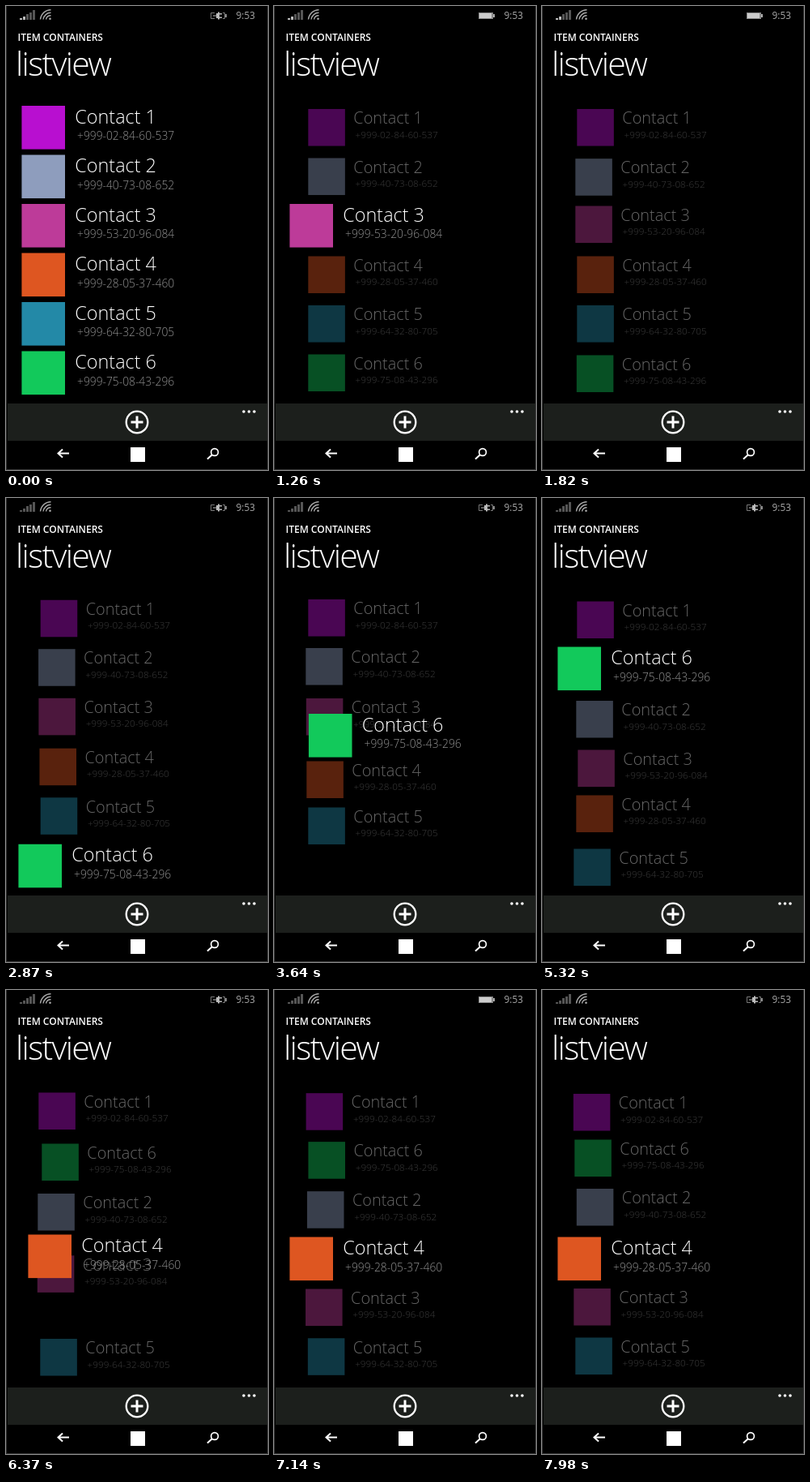
Write an HTML page that moves like this. It is 324 px wide and 572 px high and loops after 8000 ms.

```html
<!DOCTYPE html>
<html lang="en">
<head>
<meta charset="utf-8">
<title>List reorder</title>
<style>
  html, body { margin: 0; width: 100%; height: 100%; overflow: hidden; background: #000; }
  svg { display: block; width: 324px; height: 572px; }
  text { font-family: "Open Sans", "Noto Sans", sans-serif; fill: #fff; }
  .section { font-size: 12px; font-weight: 600; }
  .title { font-size: 41px; font-weight: 350; letter-spacing: -1.7px; }
  .name { font-size: 23.4px; font-weight: 350; }
  .phone { font-size: 13.8px; font-weight: 350; fill: #949494; }
  .clock { font-size: 11.8px; fill: #aaa; }
  .line { fill: none; stroke: #fff; }
  .status { fill: none; stroke: #aaa; }
</style>
</head>
<body>
<svg viewBox="0 0 324 572">
  <rect width="324" height="572"/>
  <g id="signal"></g>
  <g class="status" stroke-width="1.4">
    <path d="M42.500 16.500A13 13 0 0 1 55.500 4.800M46 16.500A9.500 9.500 0 0 1 55.500 8.300M49.500 16.500A6 6 0 0 1 55.500 11.800"/>
    <circle cx="54.500" cy="15.800" r="1.300" fill="#aaa" stroke="none"/>
  </g>
  <g id="full">
    <rect x="253" y="8" width="18" height="8" fill="#888"/>
    <rect x="254" y="9" width="15" height="6" fill="#ccc"/>
    <rect x="271" y="10" width="2" height="4" fill="#aaa"/>
  </g>
  <g id="plug">
    <path class="status" d="M258 8.500H253.500V15.500H258M268 8.500H270.500V15.500H268" stroke-opacity=".7"/>
    <path d="M256 11.500h4v-2.500h2v-1.500h2v9h-2v-1.500h-2v-2.500h-4zM264 9h3v1.500h-3zM264 13.500h3v1.500h-3z" fill="#bbb"/>
    <rect x="271" y="10" width="2" height="4" fill="#888"/>
  </g>
  <text class="clock" x="284.500" y="16">9:53</text>
  <text class="section" x="14.500" y="43">ITEM CONTAINERS</text>
  <text class="title" x="12" y="86">listview</text>

  <g id="list"></g>

  <rect x="2" y="490" width="321" height="46" fill="#1c1f1c"/>
  <circle class="line" cx="162" cy="513" r="13.300" stroke-width="2.300"/>
  <path class="line" d="M154.500 513h15M162 505.500v15" stroke-width="3"/>
  <g fill="#fff">
    <circle cx="294" cy="500" r="1.800"/>
    <circle cx="300.500" cy="500" r="1.800"/>
    <circle cx="307" cy="500" r="1.800"/>
  </g>
  <path class="line" d="M78 551.500H65M70 546.500L64.500 551.500L70 556.500" stroke-width="2"/>
  <rect x="154" y="544" width="18" height="18" fill="#fff"/>
  <circle class="line" cx="258" cy="550" r="4.400" stroke-width="1.700"/>
  <path class="line" d="M254.800 553.300L249 558.500" stroke-width="2"/>
  <path class="line" d="M.5 0V571.500H323.500V0" stroke="#fff" stroke-opacity=".2"/>
</svg>
<script>
const LOOP = 8000, STEP = 70;
const PIVOT = 172, SMALL = 0.85, DIM = 0.4;
const slot = i => 149.5 + 60.5 * i;
const $ = id => document.getElementById(id);

function add(parent, tag, attrs, text) {
  const el = document.createElementNS("http://www.w3.org/2000/svg", tag);
  for (const key in attrs) el.setAttribute(key, attrs[key]);
  if (text) el.textContent = text;
  return parent.appendChild(el);
}

// Eased value of a track of [time, value] keys.
function at(keys, t) {
  if (t <= keys[0][0]) return keys[0][1];
  for (let i = 1; i < keys.length; i++) {
    const [a, from] = keys[i - 1], [b, to] = keys[i];
    if (t < b) {
      const u = (t - a) / (b - a);
      return from + (to - from) * u * u * (3 - 2 * u);
    }
  }
  return keys[keys.length - 1][1];
}

const move = (start, length, from, to) =>
  [[start, slot(from)], [start + length, slot(to)]];

const SHRINK = [[350, 1], [560, 0]];
const DRIFT_TIMES = [1400, 1820, 3640, 4620, 5320, 6370, 7980];
const drift = values => DRIFT_TIMES.map((t, i) => [t, i ? values[i - 1] : 0]);

// size: 1 is selected, 0 is floating; x: drag offset; dx, dy: floating drift
const items = [
  {
    color: "#b80fd0", phone: "+999-02-84-60-537",
    y: [[0, slot(0)]], size: SHRINK,
    dx: [1, 0, 1, 1, -2, -3.5], dy: [0, -2, 0, 0.5, -0.5, 1]
  },
  {
    color: "#8e9dbd", phone: "+999-40-73-08-652",
    y: move(4480, 350, 1, 2), size: SHRINK,
    dx: [-1, -3, 1, 0, -3, 0.5], dy: [0.7, -2.5, 0, 2, 3, -3]
  },
  {
    color: "#bd3b99", phone: "+999-53-20-96-084",
    y: [...move(4620, 350, 2, 3), ...move(6240, 350, 3, 4)],
    size: [[1330, 1], [1540, 0]],
    dx: [-1, -2.5, 1.5, 2, -3.5, -3], dy: [-1.5, -1, 1, 2, 0, -1]
  },
  {
    color: "#de5621", phone: "+999-28-05-37-460",
    y: [...move(3500, 420, 3, 4), ...move(4130, 350, 4, 3), ...move(4690, 350, 3, 4),
        [5880, slot(4)], [6370, 328], [6440, 327], [6720, slot(3)]],
    x: [[5600, 0], [5880, -3], [6370, 8], [6440, 8], [6720, 0]],
    size: [...SHRINK, [5600, 0], [5810, 1]],
    dx: [1, -2, -0.5, 0, 0, 0], dy: [0, 0.3, -2, -2.5, 0, 0]
  },
  {
    color: "#2389a7", phone: "+999-64-32-80-705",
    y: [...move(3520, 420, 4, 5), ...move(4130, 350, 5, 4), ...move(4760, 350, 4, 5)],
    size: SHRINK,
    dx: [1, 0, -2, -3, 0, -1], dy: [0, 0.5, 2, 3, 0.5, -1]
  },
  {
    color: "#12c95b", phone: "+999-75-08-43-296",
    y: [[2660, slot(5)], [2940, 453.5], [3080, slot(5)], [3640, 292.5],
        [4130, 252], [4620, 196.5], [5040, slot(1)]],
    x: [[2660, 0], [2870, -4], [3080, 0], [3640, 23.5], [4130, -2],
        [4620, 23], [4900, -2], [5110, 0]],
    size: [...SHRINK, [2590, 0], [2800, 1], [5600, 1], [5810, 0]],
    dx: [0.5, 0, 0, 0, 2, -2], dy: [1, 0, 0, 0, 2, -3]
  }
];

const list = $("list");
items.forEach((item, i) => {
  item.dx = drift(item.dx);
  item.dy = drift(item.dy);
  item.el = add(list, "g", {});
  add(item.el, "rect", { x: 19.4, y: -26.5, width: 53.6, height: 53.6, fill: item.color });
  add(item.el, "text", { class: "name", x: 85.3, y: -5 }, "Contact " + (i + 1));
  add(item.el, "text", { class: "phone", x: 88, y: 15.5 }, item.phone);
});

const bars = [2, 4, 7, 9, 12].map((h, i) =>
  add($("signal"), "rect", { x: 17 + i * 4, y: 17 - h, width: 3, height: h }));

// The dropped item joins its new neighbours in paint order.
let dropped = false;
function reorder(now) {
  if (now === dropped) return;
  dropped = now;
  list.insertBefore(items[5].el, now ? items[1].el : null);
}

function draw(t) {
  for (const item of items) {
    const size = at(item.size, t);
    const scale = SMALL + (1 - SMALL) * size;
    const x = PIVOT * (1 - scale) + at(item.dx, t) * (1 - size) + (item.x ? at(item.x, t) : 0);
    const y = at(item.y, t) + at(item.dy, t) * (1 - size);
    item.el.setAttribute("transform", `translate(${x} ${y}) scale(${scale})`);
    item.el.setAttribute("opacity", DIM + (1 - DIM) * size);
  }
  reorder(t >= 4480);

  const charging = Math.floor((t + 490) / 1400) % 2 === 0;
  $("plug").setAttribute("visibility", charging ? "visible" : "hidden");
  $("full").setAttribute("visibility", charging ? "hidden" : "visible");
  const lit = t < 2310 ? 2 : 0;
  bars.forEach((bar, i) => bar.setAttribute("fill", i < lit ? "#bbb" : "#555"));
}

const start = performance.now();
function tick() {
  const t = (performance.now() - start) % LOOP;
  draw(Math.floor(t / STEP) * STEP);
  requestAnimationFrame(tick);
}
draw(0);
requestAnimationFrame(tick);
</script>
</body>
</html>
```
